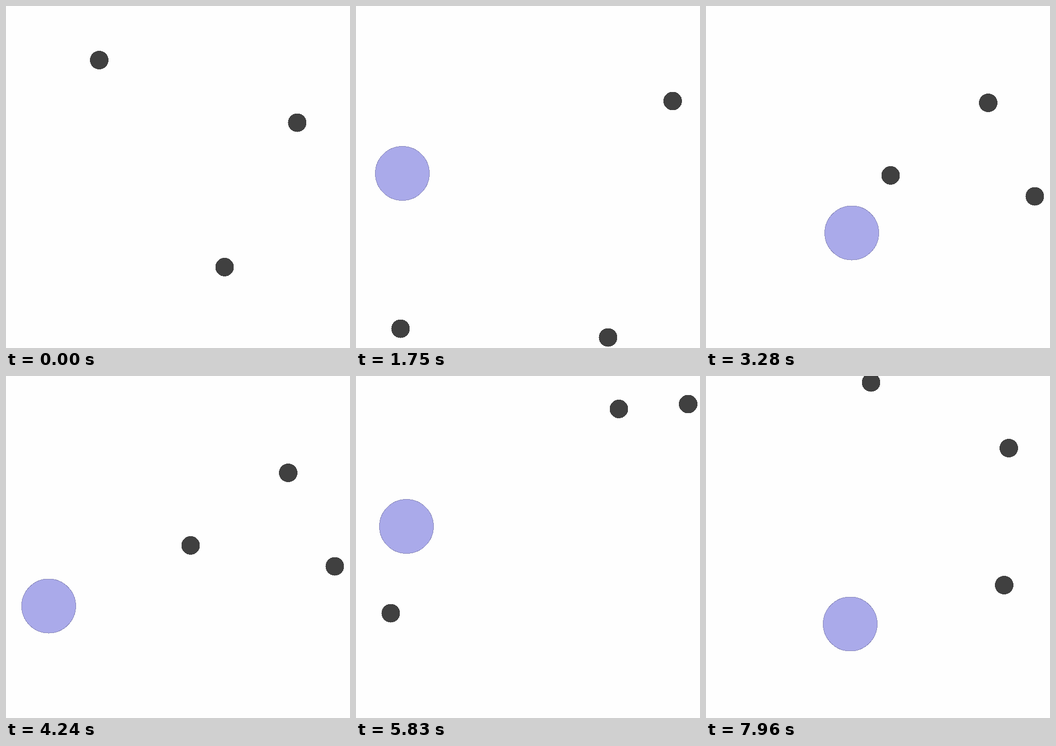
An HTML page for the animation above (8 s loop, 668 by 664 pixels).

```html
<!DOCTYPE html>
<html lang="en">
<head>
<meta charset="utf-8">
<title>Dots and touches</title>
<style>
  html, body { margin: 0; width: 100%; height: 100%; overflow: hidden; background: #fefefe; }
  svg { display: block; width: 668px; height: 664px; shape-rendering: crispEdges; }
  .dot { fill: #404040; }
  .touch { fill: #aaaaea; stroke: #8888ba; stroke-width: 1; }
</style>
</head>
<body>
<svg viewBox="0 0 668 664"></svg>
<script>
const LOOP = 8000;
const svg = document.querySelector("svg");

// The dots jump to a new layout whenever three fingers tap
const layouts = [
  { from: 0, dots: [[181, 105], [565.5, 226.5], [424.5, 507]] },
  { from: 260, dots: [[615, 184.5], [86.5, 626.5], [489.5, 643.5]] },
  { from: 2640, dots: [[548, 188], [358.5, 329], [638.5, 369.5]] },
  { from: 5120, dots: [[510.5, 64], [645, 54.5], [67.5, 460.5]] },
  { from: 7610, dots: [[320.5, 12.5], [588, 140], [579, 406]] }
];

// One finger follows a curve through start, middle and end in n steps;
// the other fingers of a tap show in the first step only
const swipes = [
  { from: 260, to: 900, n: 9, path: [[590, 610], [600, 330], [350, 50]], taps: [[640, 40]] },
  { from: 1490, to: 1960, n: 7, path: [[138, 610], [90, 325], [10, 70]] },
  { from: 2640, to: 3550, n: 13, path: [[597, 354.5], [410, 330], [134, 633]], taps: [[90, 310], [58, 459.5]] },
  { from: 4100, to: 4590, n: 7, path: [[92, 612], [74, 360], [30, 85]] },
  { from: 5120, to: 5900, n: 11, path: [[271.5, 465], [75, 452], [98, 292]], taps: [[412.5, 562.5], [686, -28]] },
  { from: 5970, to: 6600, n: 9, path: [[282, 640], [290, 365], [199, -12]] },
  { from: 7610, to: 8020, n: 6, path: [[75, 452], [205, 395], [280, 481.5]], taps: [[400, 545], [625, 615]] }
];

function makeCircles(name, r) {
  return [0, 1, 2].map(() => {
    const c = document.createElementNS("http://www.w3.org/2000/svg", "circle");
    c.setAttribute("class", name);
    c.setAttribute("r", r);
    return svg.appendChild(c);
  });
}

const touches = makeCircles("touch", 52.5);
const dots = makeCircles("dot", 18);

function place(circles, points) {
  circles.forEach((c, i) => {
    const p = points[i];
    c.style.display = p ? "" : "none";
    if (!p) return;
    c.setAttribute("cx", p[0]);
    c.setAttribute("cy", p[1]);
  });
}

// Parabola through a, b and c at u = 0, 0.5 and 1
function along([a, b, c], u) {
  return [0, 1].map(i =>
    a[i] * (2 * u - 1) * (u - 1) + b[i] * 4 * u * (1 - u) + c[i] * u * (2 * u - 1));
}

function fingers(t) {
  const s = swipes.find(s => t >= s.from && t < s.to);
  if (!s) return [];
  const step = Math.floor(s.n * (t - s.from) / (s.to - s.from));
  const main = along(s.path, step / (s.n - 1));
  return step === 0 && s.taps ? [main, ...s.taps] : [main];
}

function draw(t) {
  place(dots, layouts.filter(l => l.from <= t).pop().dots);
  place(touches, fingers(t));
}

const begin = performance.now();
function tick() {
  draw((performance.now() - begin) % LOOP);
  requestAnimationFrame(tick);
}
draw(0);
requestAnimationFrame(tick);
</script>
</body>
</html>
```
